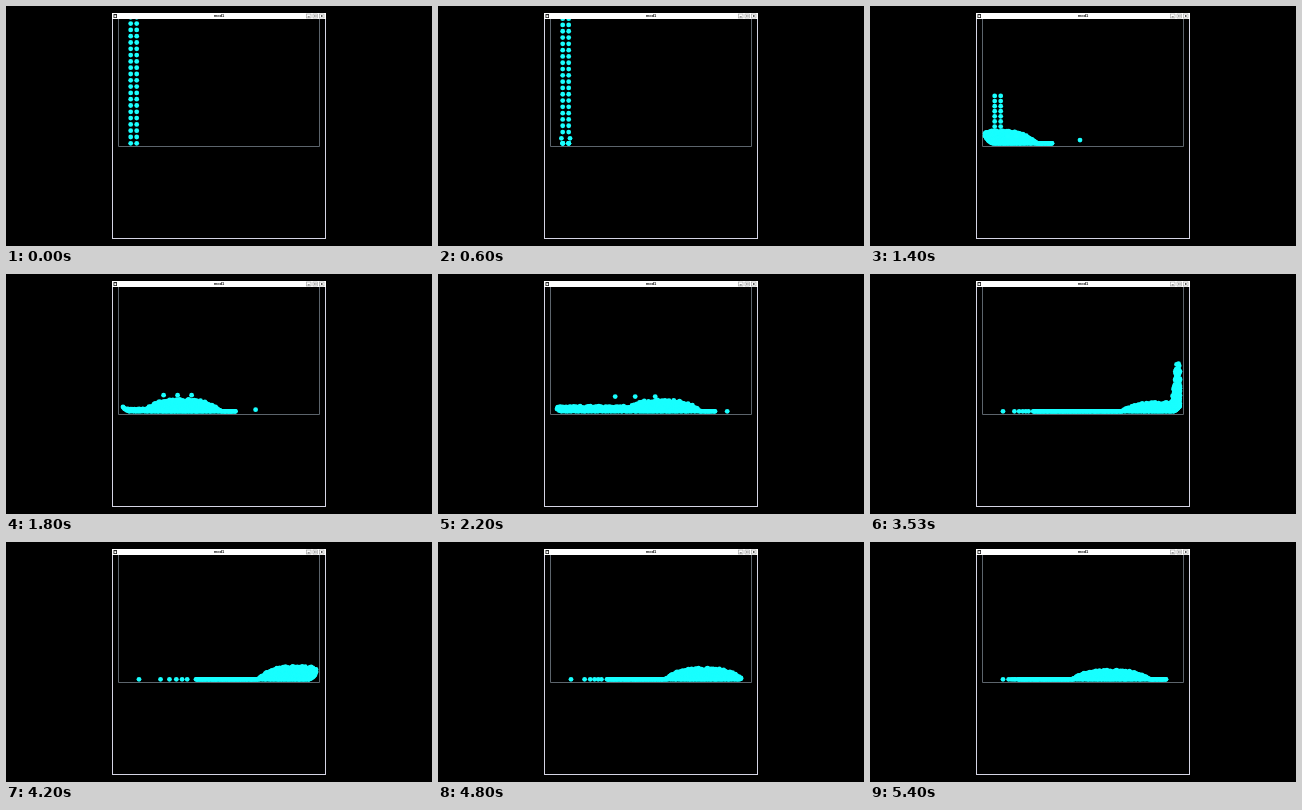
An HTML page with a canvas for the animation above (5.47 s loop, 426x240 px).

```html
<!DOCTYPE html>
<html lang="en">
<head>
<meta charset="utf-8">
<title>Falling fluid</title>
<style>
  html, body { margin: 0; width: 100%; height: 100%; overflow: hidden; background: #000; }
  canvas { display: block; width: 426px; height: 240px; }
</style>
</head>
<body>
<canvas id="stage" width="426" height="240"></canvas>
<script>
const ctx = document.getElementById('stage').getContext('2d');
const LOOP = 5470, STEP = 200 / 3;
const FLOOR = 137.3, LEFT_WALL = 114, RIGHT_WALL = 312;
const GRAVITY = 112.4, RADIUS = 2.4;
const COUNT = 620, BINS = 250, POUR_START = 0.63, HEAP_REACH = 39;

const lerp = (a, b, p) => a + (b - a) * p;
const clamp = (v, lo, hi) => Math.min(hi, Math.max(lo, v));

// Value that runs straight between [seconds, value] points
const track = (...points) => t => {
  const i = clamp(points.findIndex(p => p[0] >= t), 1, points.length - 1);
  const [t0, v0] = points[i - 1], [t1, v1] = points[t > points[i][0] ? points.length - 1 : i];
  if (t >= points[points.length - 1][0]) return points[points.length - 1][1];
  return lerp(v0, v1, clamp((t - t0) / (t1 - t0), 0, 1));
};

const poolLeft = track([0.6, 122], [1.4, 115], [2.2, 119], [2.93, 139], [4.2, 190], [5.4, 148]);
const poolRight = track([0.6, 133], [1.4, 182], [2.2, 277], [2.7, 310], [4.2, 310], [5.4, 296]);
const crest = track([1.4, 128], [2.2, 224], [2.93, 290], [4.2, 291], [5.4, 241]);
const heap = track([0.6, 0], [1.4, 11], [2.2, 10], [2.93, 4.5], [4.2, 11.5], [5.4, 8]);
const wake = track([1.4, 0], [2.2, 4.5], [2.93, 0]);
const surge = track([2.6, 0], [2.93, 52], [3.25, 50], [4.2, 0]);

function seededRandom(seed) {
  return () => (seed = seed * 16807 % 2147483647) / 2147483647;
}

const random = seededRandom(71);
const particles = Array.from({ length: COUNT }, (_, i) => ({
  rank: i / (COUNT - 1),
  level: clamp((i * 0.618034) % 1 * 1.2 - 0.1, 0, 1) * (0.8 + 0.35 * random()),
  shift: random() - 0.5
}));

// The fluid rounds off towards the side walls
function cornerRise(x) {
  const gap = Math.min(x - LEFT_WALL, RIGHT_WALL - x);
  return gap < 10 ? 9 * ((10 - gap) / 10) ** 2 : 0;
}

// Heap, wake behind it and surge up the right wall
function outline(t) {
  const middle = crest(t), heapHeight = heap(t), wakeHeight = wake(t), surgeHeight = surge(t);
  return x => {
    const bump = heapHeight * Math.max(0, 1 - Math.abs((x - middle) / HEAP_REACH) ** 3);
    const trail = x < middle ? wakeHeight : 0;
    const climb = clamp((x - 300) / 6, 0, 1);
    const height = Math.max(bump, trail) + surgeHeight * climb * climb;
    return Math.max(0, height - cornerRise(x));
  };
}

function dot(x, y) {
  ctx.beginPath();
  ctx.arc(x, y, RADIUS, 0, Math.PI * 2);
  ctx.fill();
}

function drawColumns(t) {
  const rows = 25;
  const spacing = 6.3 - 1.5 * Math.max(0, t - 0.6);
  const top = FLOOR - rows * 6.3 + GRAVITY * t * t / 2;
  const limit = t < POUR_START ? Infinity : FLOOR;
  for (let row = 0; row <= rows; row++) {
    const y = top + row * spacing;
    if (y > limit) break;
    const bulge = t > 0.4 && y > 128 && y < FLOOR ? 1.3 : 0;
    dot(124.7 - bulge, Math.min(y, FLOOR));
    dot(130.7 + bulge, Math.min(y, FLOOR));
  }
}

// Spreads the particles evenly over the area under the outline
function drawPool(t) {
  if (t < POUR_START) return;
  const depth = outline(t), left = poolLeft(t), width = poolRight(t) - left;
  const sums = [0];
  for (let b = 0; b < BINS; b++) {
    sums.push(sums[b] + depth(left + width * (b + 0.5) / BINS) + 2);
  }
  let bin = 0;
  for (const { rank, level, shift } of particles) {
    const mass = sums[BINS] * rank;
    while (bin < BINS - 1 && sums[bin + 1] < mass) bin++;
    const part = (mass - sums[bin]) / (sums[bin + 1] - sums[bin]);
    const x = clamp(left + width * (bin + part) / BINS + shift, left, left + width);
    dot(x, FLOOR - cornerRise(x) - level * depth(x));
  }
}

function drawSpray(t) {
  // Drops thrown ahead by the first splash
  if (t > 1.2 && t < 2.7) {
    const hop = 17 * Math.sin(Math.PI * (t - 1.2) / 1.5);
    for (let k = 0; k < 3; k++) {
      dot(138 + 8 * k + (49 + 15 * k) * (t - 1.4), FLOOR - hop);
    }
  }
  // One drop runs in front of the wave
  if (t > 1 && t < 2.4) dot(210 + 99 * (t - 1.4), FLOOR - 4 * Math.max(0, 2.2 - t));
  // Drops flung off the right wall
  if (t > 2.75 && t < 3.5) {
    for (let k = 0; k < 4; k++) dot(310 - 4.4 * k, FLOOR - surge(t) * (1.25 - 0.12 * k));
  }
  // Stragglers on the floor behind the pool
  if (t > 2.8) {
    for (let k = 0; k < 6; k++) dot(lerp(133, poolLeft(t), Math.sqrt(k / 7)), FLOOR);
  }
}

function drawWindow() {
  ctx.lineWidth = 1;
  ctx.strokeStyle = '#d4d4e4';
  ctx.strokeRect(106.5, 7.5, 213, 225);
  ctx.strokeStyle = '#5c646c';
  ctx.beginPath();
  ctx.moveTo(112.5, 13);
  ctx.lineTo(112.5, 140.5);
  ctx.lineTo(313.5, 140.5);
  ctx.lineTo(313.5, 13);
  ctx.stroke();
}

function drawTitleBar() {
  ctx.fillStyle = '#fff';
  ctx.fillRect(106, 7, 214, 6);
  ctx.fillStyle = '#222';
  ctx.fillRect(107.5, 8, 3.5, 4);
  ctx.fillStyle = '#fff';
  ctx.fillRect(108.3, 9.2, 1.9, 2);
  ctx.fillStyle = '#111';
  ctx.font = 'bold 4px "Liberation Sans", sans-serif';
  ctx.textAlign = 'center';
  ctx.fillText('mod1', 213, 11.4);
  ctx.strokeStyle = '#999';
  ctx.lineWidth = 0.6;
  for (let k = 0; k < 3; k++) ctx.strokeRect(300.5 + 6.5 * k, 8, 4.5, 4);
  ctx.fillStyle = '#333';
  ctx.fillRect(301.7, 10.5, 2, 0.8);
  ctx.strokeRect(308.3, 9.2, 1.9, 1.6);
  ctx.fillRect(315, 9.2, 1.5, 1.6);
}

function draw(now) {
  const t = Math.floor((now % LOOP + 4) / STEP) * STEP / 1000;
  ctx.fillStyle = '#000';
  ctx.fillRect(0, 0, 426, 240);
  drawWindow();
  ctx.fillStyle = '#19ffff';
  drawColumns(t);
  drawPool(t);
  drawSpray(t);
  drawTitleBar();
  ctx.fillStyle = '#000';
  ctx.fillRect(0, 0, 426, 7);
}

let start;
function tick(now) {
  start ??= now;
  draw(now - start);
  requestAnimationFrame(tick);
}
draw(0);
requestAnimationFrame(tick);
</script>
</body>
</html>
```
